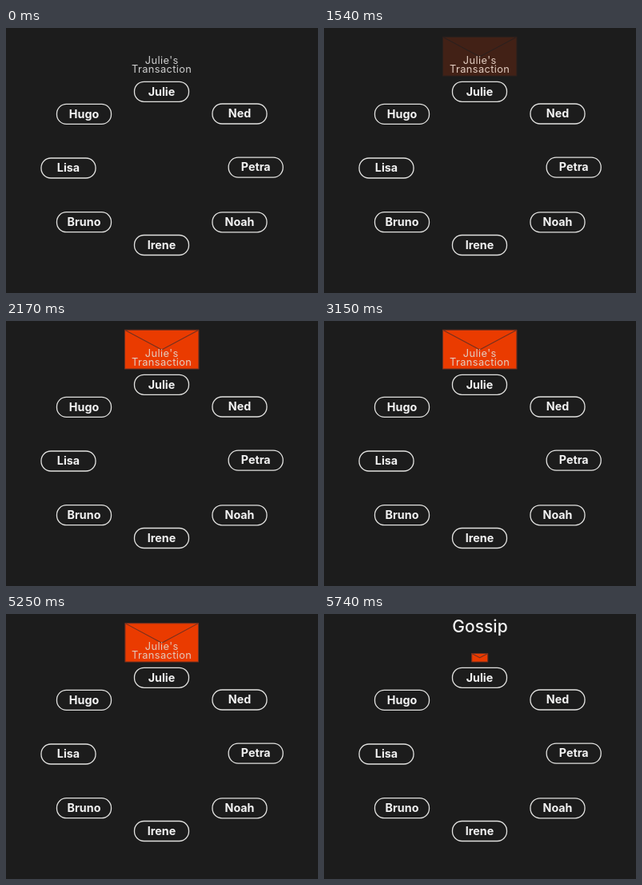
Write an HTML page that moves like this. It is 390 px wide and 332 px high and loops after 8 s.

```html
<!DOCTYPE html>
<html lang="en">
<head>
<meta charset="utf-8">
<title>Gossip</title>
<style>
  html, body { margin: 0; width: 100%; height: 100%; overflow: hidden; background: #1c1c1c; }
  svg { display: block; width: 390px; height: 332px; }
  text { font-family: Inter, "Open Sans", sans-serif; text-anchor: middle; fill: #f2f2f2; }
  .pill { fill: none; stroke: #e2e2e0; stroke-width: 1.3; }
  .name { font-size: 14.3px; font-weight: 700; }
  .label text { font-size: 12.8px; font-weight: 400; letter-spacing: .4px; fill: inherit; }
  #title { font-size: 21px; font-weight: 500; }
  #envelope { stroke: #74301f; stroke-width: 1.1; stroke-linejoin: round; }
</style>
</head>
<body>
<svg viewBox="0 0 390 332">
  <g id="nodes"></g>
  <g id="envelope">
    <path id="sheet" fill="#ea3b00"/>
    <path id="flap" fill="none"/>
  </g>
  <g id="label" class="label">
    <text x="194.7" y="45.2">Julie's</text>
    <text x="194.7" y="56.2">Transaction</text>
  </g>
  <text id="title" x="195" y="23.3">Gossip</text>
</svg>
<script>
const LOOP = 8000, STEP = 70, FADE = 550;
const NODES = [
  ["Julie", 194.5, 79.8], ["Ned", 292, 107.5], ["Petra", 312.2, 174.6], ["Noah", 292, 243.3],
  ["Irene", 194.5, 272], ["Bruno", 97.5, 243.2], ["Lisa", 78, 175.5], ["Hugo", 97.5, 107.9]
];
const $ = id => document.getElementById(id);

function add(tag, attrs, text) {
  const el = document.createElementNS("http://www.w3.org/2000/svg", tag);
  for (const key in attrs) el.setAttribute(key, attrs[key]);
  if (text) el.textContent = text;
  $("nodes").append(el);
}

for (const [name, x, y] of NODES) {
  add("rect", { class: "pill", x: x - 34, y: y - 12.5, width: 68, height: 25, rx: 12 });
  add("text", { class: "name", x, y: y + 4.7 }, name);
}

const clamp = v => Math.min(1, Math.max(0, v));
const mix = (a, b, k) => a + (b - a) * k;

// Sigmoid easing, normalised to run from 0 to 1
function smooth(t) {
  const sig = x => 1 / (1 + Math.exp(-x));
  const edge = sig(-5);
  return clamp((sig(10 * (clamp(t) - .5)) - edge) / (1 - 2 * edge));
}

// The envelope shrinks towards the middle of its bottom edge
function drawEnvelope(k) {
  const w = mix(92.4, 20, k), h = mix(48.8, 10.5, k);
  const cx = 194.7, bottom = 60;
  const left = cx - w / 2, right = cx + w / 2, top = bottom - h;
  $("sheet").setAttribute("d", `M${left} ${top}H${right}V${bottom}H${left}Z`);
  $("flap").setAttribute("d", `M${left} ${top}L${cx} ${top + h * .51}L${right} ${top}`);
}

function render(ms) {
  const t = Math.floor(ms / STEP) * STEP;
  const show = smooth((t - 1345) / FADE);
  const shrink = smooth((t - 5195) / FADE);
  $("envelope").style.opacity = show;
  drawEnvelope(shrink);
  $("label").style.fill = show > 0 ? "#e3cdc1" : "#cfcfcf";
  $("label").style.opacity = clamp(1 - 2.4 * shrink);
  $("title").style.opacity = clamp(2 * shrink - 1);
}

function tick() {
  render(performance.now() % LOOP);
  requestAnimationFrame(tick);
}
tick();
</script>
</body>
</html>
```
